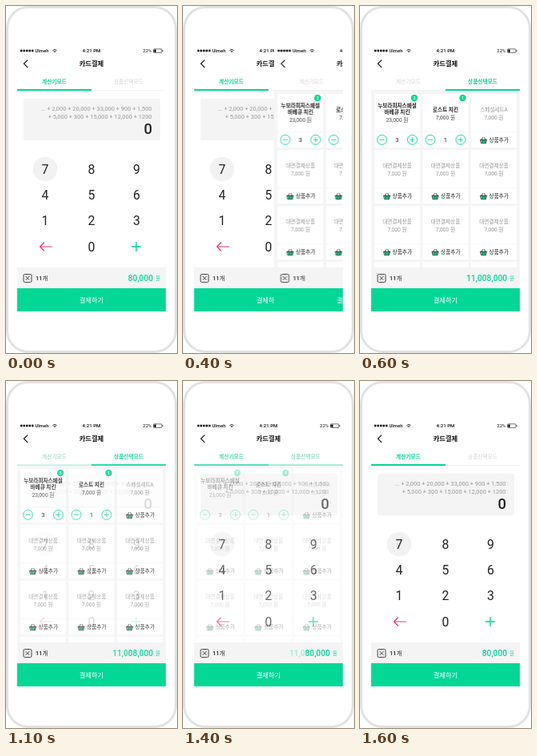
Write an HTML page that moves like this. It is 214 px wide and 434 px high and loops after 1.7 s.

```html
<!DOCTYPE html>
<html lang="ko">
<head>
<meta charset="utf-8">
<title>카드결제</title>
<style>
  html, body { margin: 0; width: 100%; height: 100%; overflow: hidden; background: #fff; }
  svg { display: block; width: 100vw; height: 100vh; }
  text { font-family: Roboto, "Noto Sans CJK KR", "Noto Sans CJK", sans-serif; }
  .line { fill: none; stroke-linecap: round; stroke-linejoin: round; }
  /* Slides over in coarse steps, holds, then fades away in coarse steps. */
  #products { animation: flow 1700ms infinite; }
  @keyframes flow {
    0%, 11.76% { transform: translateX(201px); opacity: 1; animation-timing-function: steps(4, end); }
    35.29% { transform: translateX(0); opacity: 1; }
    58.82% { transform: translateX(0); opacity: 1; animation-timing-function: steps(6, end); }
    94.11%, 100% { transform: translateX(0); opacity: 0; }
  }
</style>
</head>
<body>
<svg viewBox="0 0 214 434">
  <defs>
    <clipPath id="screen"><rect x="14" y="48" width="186" height="334"/></clipPath>
    <g id="basket" class="line" stroke="#333" stroke-width=".8">
      <path d="M-3.7-.6H3.7L2.8 3.7H-2.8Z" fill="#19d69b"/>
      <path d="M-2.6-.7L-.9-3.7M2.6-.7L.9-3.7M-4.1-.7H4.1M-1.3 .8V2.3M1.3 .8V2.3"/>
    </g>
  </defs>
  <rect x="1.5" y="1.5" width="211" height="431" rx="26.5" fill="#fff" stroke="#e2e2e2" stroke-width="3"/>
  <g clip-path="url(#screen)">
    <g id="calculator"></g>
    <g id="products"></g>
  </g>
</svg>
<script>
const GREEN = '#02d796', DARK = '#222', GRAY = '#999', PALE = '#d2d2d2', PANEL = '#f4f4f4';

const rect = (x, y, w, h, fill, extra = '') =>
  `<rect x="${x}" y="${y}" width="${w}" height="${h}" fill="${fill}" ${extra}/>`;
const circle = (x, y, r, fill, extra = '') =>
  `<circle cx="${x}" cy="${y}" r="${r}" fill="${fill}" ${extra}/>`;
const line = (d, stroke, width = 1) =>
  `<path class="line" d="${d}" stroke="${stroke}" stroke-width="${width}"/>`;
const text = (str, x, y, size, fill = DARK, weight = 400, anchor = 'middle') =>
  `<text x="${x}" y="${y}" font-size="${size}" fill="${fill}" font-weight="${weight}" text-anchor="${anchor}">${str}</text>`;

function statusBar() {
  const dots = [0, 1, 2, 3, 4].map(i => circle(19.2 + i * 3.5, 56, 1.45, '#111')).join('');
  return dots + text('Ulmeh', 36.5, 58.2, 5.9, '#111', 500, 'start') +
    line('M58.7 55.2Q61 53.2 63.3 55.2M59.8 56.6Q61 55.6 62.2 56.6', '#111', .8) +
    circle(61, 57.8, .6, '#111') +
    text('4:21 PM', 107, 58.2, 6.1, '#111', 500) +
    text('22%', 182.5, 58.2, 6, '#111', 400, 'end') +
    rect(184.5, 53.8, 10.5, 4.6, 'none', 'rx=".8" stroke="#111" stroke-width=".6"') +
    rect(185.2, 54.5, 2.6, 3.2, '#111') + rect(195.6, 55.3, .9, 1.6, '#111');
}

function chrome(activeTab, total) {
  const tab = (i, label, x) =>
    text(label, x, 97, 6.7, i === activeTab ? GREEN : PALE, i === activeTab ? 700 : 400);
  return statusBar() +
    line('M26.8 67.8L22.4 72.2L26.8 76.6', '#111', 1.2) +
    text('카드결제', 107, 75.3, 8.3, '#111', 700) +
    tab(0, '계산기모드', 60.5) + tab(1, '상품선택모드', 153.5) +
    rect(14, 105, 186, .7, '#eee') +
    rect(14 + activeTab * 93, 104, 93, 2, GREEN) +
    rect(14, 327, 186, 26, PANEL) +
    rect(22, 335.5, 10, 10, 'none', 'rx="1.5" stroke="#333" stroke-width=".9"') +
    line('M24.8 338.3L29.2 342.7M29.2 338.3L24.8 342.7', '#333', .9) +
    text('11개', 37, 343.4, 7.4, DARK, 500, 'start') +
    text(total, 184, 344, 10.2, GREEN, 500, 'end') +
    text('원', 193, 343, 6.5, GREEN, 400, 'end') +
    rect(14, 353, 186, 29, GREEN) +
    text('결제하기', 107, 371, 8.3, '#fff', 500);
}

function keypad() {
  const digits = [7, 8, 9, 4, 5, 6, 1, 2, 3].map((n, i) =>
    text(n, [49, 107, 163.5][i % 3], 209.8 + Math.floor(i / 3) * 32.3, 15.8)).join('');
  return circle(49, 204, 15.3, '#f2f2f2') + digits + text(0, 107, 306.7, 15.8) +
    line('M57.5 301H42.5M47.5 296L42.5 301L47.5 306', '#f0386b', 1.2) +
    line('M157.5 301H168.5M163 295.5V306.5', GREEN, 1.4);
}

function stepper(x, y, count) {
  const ring = `stroke="${GREEN}" stroke-width=".9"`;
  return circle(x - 19, y, 6, '#fff', ring) + circle(x + 19, y, 6, '#fff', ring) +
    line(`M${x - 21.5} ${y}h5M${x + 16.5} ${y}h5M${x + 19} ${y - 2.5}v5`, GREEN, .9) +
    text(count, x, y + 2.8, 7.8);
}

function card(col, row, { name = ['대면결제상품'], price = '7,000', count = 0 } = {}) {
  const x = 46.5 + col * 60.5, y = 110 + row * 70;
  const first = y + (name.length > 1 ? 17 : 22);
  const last = first + (name.length - 1) * 8.3;
  const names = name.map((s, i) =>
    text(s, x, first + i * 8.3, 6.6, count ? DARK : GRAY, count ? 700 : 400)).join('');
  const footer = count
    ? stepper(x, y + 57.3, count) + circle(x + 21.5, y + 5, 4.2, GREEN) +
      text(count, x + 21.5, y + 6.9, 5.2, '#fff', 500)
    : `<use href="#basket" x="${x - 12.8}" y="${y + 58}"/>` +
      text('상품추가', x - 6, y + 60.4, 6.7, DARK, 400, 'start');
  return rect(x - 28.5, y, 57, 67, '#fff', 'rx="1"') +
    rect(x - 28.5, y + 47, 57, .6, '#f2f2f2') + names +
    text(price + ' 원', x, last + 9.7, 6.7, count ? '#444' : GRAY) + footer;
}

const featured = [
  { name: ['누보라피자스페셜', '바베큐 치킨'], price: '23,000', count: 3 },
  { name: ['로스트 치킨'], count: 1 },
  { name: ['스페셜세트A'] }
];
const cards = Array.from({ length: 12 }, (_, i) => card(i % 3, Math.floor(i / 3), featured[i])).join('');
const page = rect(14, 48, 186, 334, '#fff');

document.getElementById('calculator').innerHTML = page +
  rect(22, 116, 171, 52, PANEL, 'rx="2"') +
  text('... + 2,000 + 20,000 + 33,000 + 900 + 1,500', 182.5, 130.5, 7.45, GRAY, 400, 'end') +
  text('+ 5,000 + 300 + 15,000 + 12,000 + 1200', 182.5, 141, 7.45, GRAY, 400, 'end') +
  text('0', 183, 160, 18.5, DARK, 500, 'end') +
  keypad() + chrome(0, '80,000');

document.getElementById('products').innerHTML = page +
  rect(14, 105, 186, 222, '#f5f5f5') + cards + chrome(1, '11,008,000');
</script>
</body>
</html>
```
